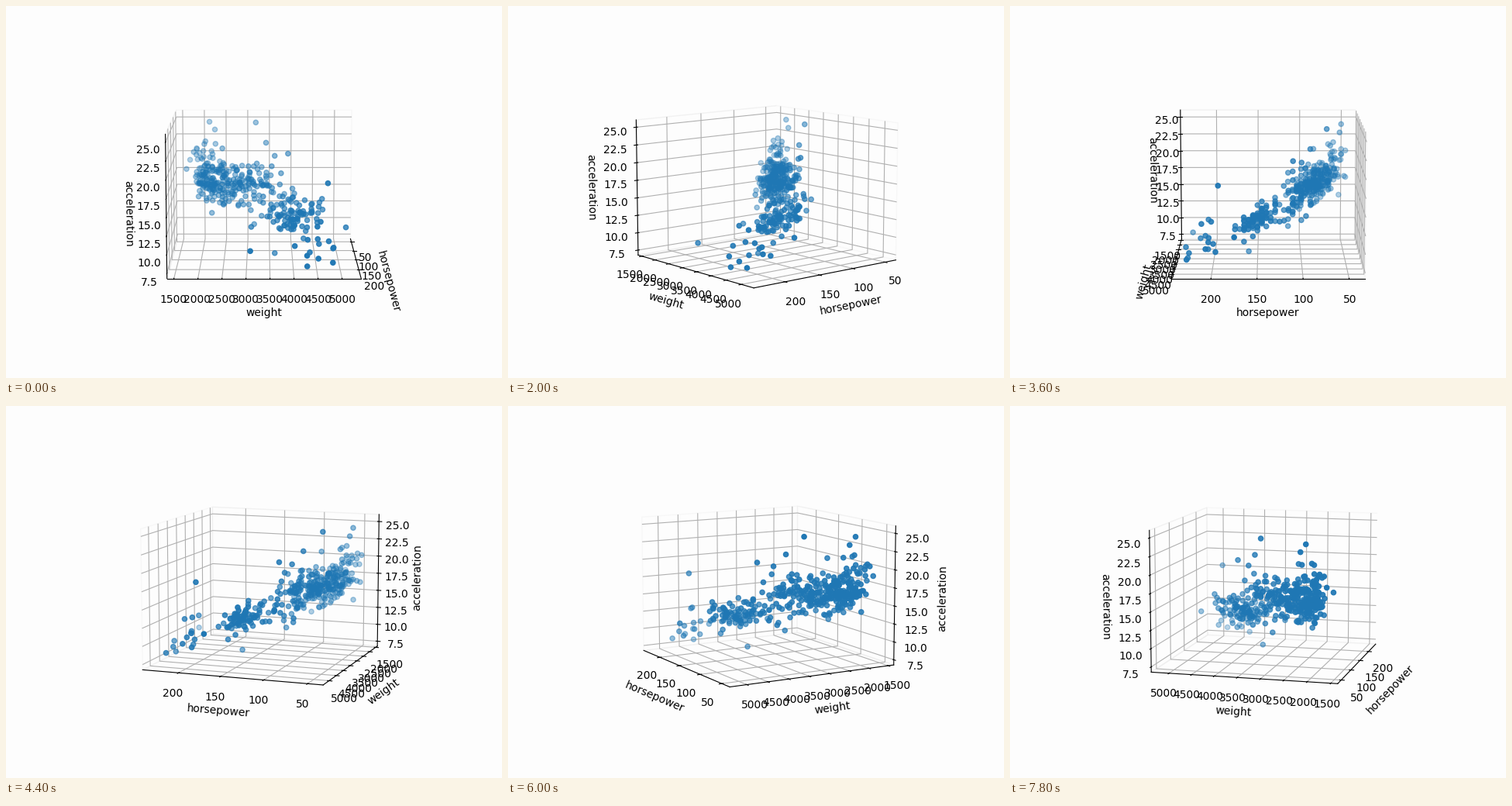
Recreate the animation shown at these times as a matplotlib script. Size 640 by 480 pixels, loop 8000 ms.

```python
import matplotlib.pyplot as plt
import numpy as np
from matplotlib.animation import FuncAnimation

FRAMES = 40
STEP_MS = 200
DEG_PER_FRAME = 5
PAPER = "#fdfdfd"

# Extremes that set the axis limits and the loosest points:
# horsepower, weight, acceleration
EXTREMES = np.array([
    (230, 4278, 9.5), (46, 1835, 20.5), (175, 5140, 12), (69, 1613, 18),
    (160, 3609, 8), (71, 3190, 24.8), (52, 2130, 24.6), (54, 2254, 23.5),
    (225, 3086, 10), (193, 4732, 18.5), (110, 3907, 21), (90, 3420, 22.2),
])

rng = np.random.default_rng(8)


def cluster(weight, hp, hp_slope, hp_sd, acc, acc_hp, acc_w, acc_sd, hp_round=1):
    """Cars of one engine class, as correlated normal spreads."""
    n = len(weight)
    dw = weight - weight.mean()
    power = hp + hp_slope * dw + rng.normal(0, hp_sd, n)
    power = np.round(power / hp_round) * hp_round
    accel = acc + acc_hp * (power - hp) + acc_w * dw + rng.normal(0, acc_sd, n)
    return np.column_stack([power, weight, np.round(accel, 1)])


economy = cluster(rng.normal(2050, 160, 12), 58, 0.02, 6, 20.5, -0.05, 0, 1)
small = cluster(rng.triangular(1760, 2020, 3080, 190),
                79, 0.025, 10, 16.3, -0.08, 0.0015, 1.35)
medium = cluster(rng.normal(3180, 310, 82),
                 100, 0.012, 9, 16.5, -0.08, 0.001, 1.6, 5)
large = cluster(rng.normal(4080, 370, 82),
                150, 0.015, 13, 13.2, -0.055, 0.001, 1, 5)
powerful = cluster(rng.normal(4500, 260, 14),
                   208, 0, 11, 10.8, -0.05, 0.002, 1.4)

cars = np.vstack([EXTREMES, economy, small, medium, large, powerful])
cars = cars.clip(EXTREMES.min(axis=0), EXTREMES.max(axis=0))

fig = plt.figure(figsize=(6.4, 4.8), dpi=100, facecolor=PAPER)
ax = fig.add_subplot(projection="3d", facecolor=PAPER)
ax.scatter(*cars.T)
ax.set_xlabel("horsepower")
ax.set_ylabel("weight")
ax.set_zlabel("acceleration")
for axis in (ax.xaxis, ax.yaxis, ax.zaxis):
    axis.pane.fill = False


def update(i):
    ax.view_init(elev=10, azim=DEG_PER_FRAME * i)
    return ()


anim = FuncAnimation(fig, update, frames=FRAMES, interval=STEP_MS,
                     init_func=lambda: (), repeat=True, repeat_delay=0)
plt.show()
```
